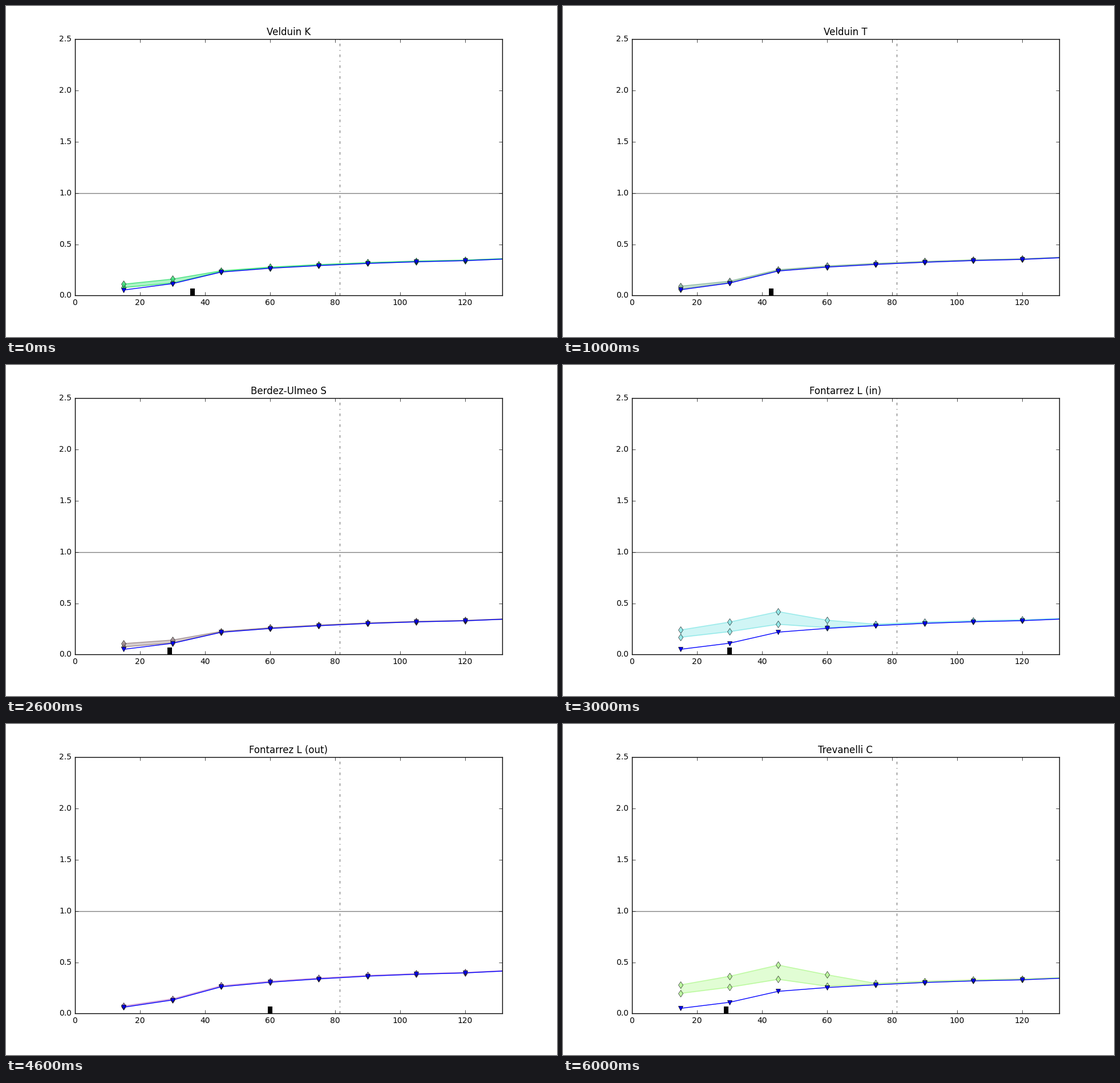
Animation, 966 px wide and 580 px high, one loop 7 s. Source, as a matplotlib script:

```python
import numpy as np
import matplotlib.pyplot as plt
from matplotlib.animation import FuncAnimation

plt.style.use("classic")
plt.rcParams.update({
    "font.family": "DejaVu Sans", "font.size": 10,
    "figure.dpi": 100, "savefig.dpi": 100, "figure.facecolor": "white",
})

RADII = np.arange(15, 136, 15)
STEP = np.arange(len(RADII))
MID_BAR = 36.25
MID_CURVE = np.array([.054, .116, .229, .266, .292, .313, .329, .340, .360])

# title, colour, bar radius, inner level, growth per step, excess
MODELS = [
    ("Velduin K", "#37e176", 36.25, .079, 1.44, .013),
    ("Velduin T", "#82b49b", 42.85, .065, 1.53, .013),
    ("Berdez-Ulmeo S", "#9b878a", 29.15, .076, 1.32, .009),
    ("Fontarrez L (in)", "#8ae8e8", 30, .170, 1.32, .018),
    ("Fontarrez L (out)", "#c896d7", 60, .040, 1.30, .011),
    ("new Fontarrez L (in)", "#9dd2bb", 19.05, .204, 1, .006),
    ("Trevanelli C", "#b4fa94", 28.95, .198, 1.30, .018),
]

fig = plt.figure(figsize=(9.66, 5.8))
ax = fig.add_axes([.125, .1252, .7756, .7748])


def reference(bar):
    """Middle curve rescaled for another bar radius."""
    d = bar - MID_BAR
    outer = np.clip((RADII - 40) / 50, 0, 1)
    slope = .0073 - .0023 * outer
    bend = (1.4 * outer - .8) * 1e-4
    return MID_CURVE * np.exp(slope * d + bend * d * d)


def band(base, level, growth, excess):
    """Inner pattern that grows to the third radius, then fades out."""
    fade = np.clip(1 - .2 * (STEP - 2), 0, 1)
    pattern = level * growth ** np.minimum(STEP, 2) * fade
    extra = excess * np.linspace(1.2, .4, len(STEP))
    low = np.maximum(base + extra / 2, pattern)
    high = np.maximum(base + extra, pattern * np.sqrt(2))
    return low, high


def draw(i):
    name, color, bar, *shape = MODELS[i]
    base = reference(bar)
    low, high = band(base, *shape)

    ax.clear()
    ax.axhline(1, color="grey")
    ax.axvline(81.4, color="grey", ls=(0, (3.24, 4.68, 1.08, 4.68)))
    ax.fill_between(RADII, low, high, color=color, alpha=.4)
    for edge in (low, high):
        ax.plot(RADII, edge, marker="d", color=color, alpha=.8)
    ax.plot(RADII, base, marker="v", color="blue")
    ax.plot([bar, bar], [0, .07], color="black", lw=5.76,
            solid_capstyle="butt")
    ax.set_xlim(0, 131.4)
    ax.set_ylim(0, 2.5)
    ax.set_title(name, fontsize=12, pad=5)
    return []


anim = FuncAnimation(fig, draw, frames=len(MODELS), interval=1000,
                     init_func=lambda: [], repeat=True, repeat_delay=0)
plt.show()
```
